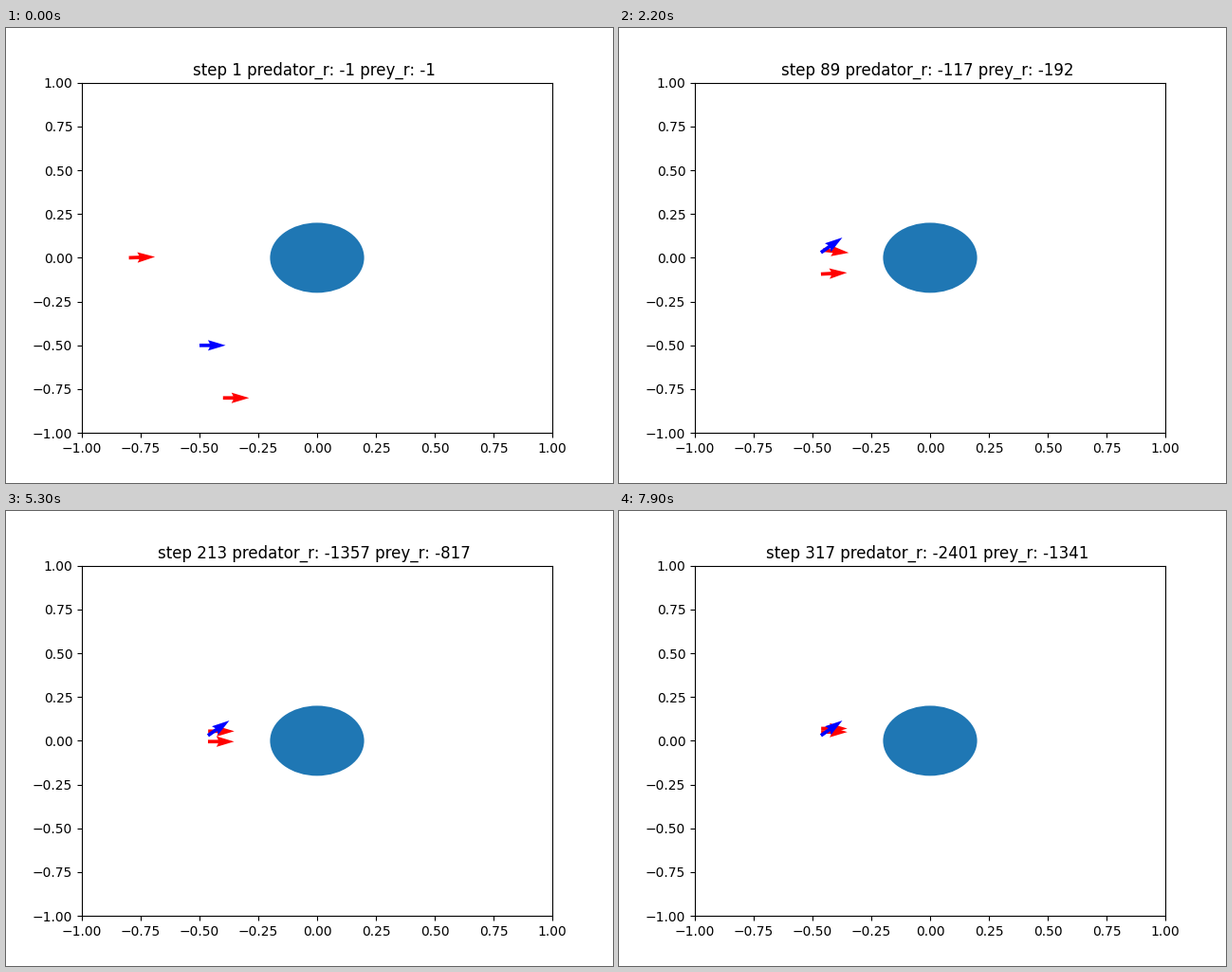
A matplotlib script that plays this animation: 640 px wide and 480 px high, repeating every 8 s.

```python
import numpy as np
import matplotlib.pyplot as plt
from matplotlib.animation import FuncAnimation

FRAMES = 80
STEPS_PER_FRAME = 4
PEAK, SWARM = 29, 90  # steps when the first and the second hunter reach the prey


def linear(t):
    return t


def accelerate(t):
    return t ** 2.2


def settle(t):
    return 1 - (1 - t) ** 2.5


def smooth(t):
    return t * t * (3 - 2 * t)


# Start pose (x, y, heading in degrees), then legs: start, end, ease, pose
HUNTER_A = (-0.8, 0, 2), [
    (0, 10, accelerate, (-0.5645, 0.056, -15)),
    (10, 22, settle, (-0.456, 0.044, -6)),
    (22, 33, linear, (-0.463, 0.033, 0)),
    (43, 61, smooth, (-0.463, 0.07, 0)),
]
HUNTER_B = (-0.4, -0.8, 0), [
    (0, 10, linear, (-0.475, -0.402, -5)),
    (10, 22, settle, (-0.464, -0.093, 3)),
    (22, 43, linear, (-0.465, -0.081, 0)),
    (43, 61, smooth, (-0.463, 0.05, 0)),
]
RUNNER = (-0.5, -0.5, 0), [
    (0, 10, linear, (-0.5, -0.078, 0)),
    (10, 16, linear, (-0.464, 0.03, 35)),
]


def pose_at(path, frame):
    start, legs = path
    pose = np.array(start, float)
    for begin, end, ease, goal in legs:
        t = np.clip((frame - begin) / (end - begin), 0, 1)
        pose += (goal - pose) * ease(t)
    return pose


def score(step, peak, late_loss):
    """Climb to the peak, then lose points at two constant rates."""
    gain = np.interp(step, [1, PEAK], [-1, peak])
    loss = 5.125 * np.clip(step - PEAK, 0, SWARM - PEAK)
    return round(gain - loss - late_loss * max(step - SWARM, 0))


fig, ax = plt.subplots(figsize=(6.4, 4.8), dpi=100)
ax.set_xlim(-1, 1)
ax.set_ylim(-1, 1)
ax.add_patch(plt.Circle((0, 0), 0.2))
title = ax.set_title("")
arrows = ax.quiver(np.zeros(3), np.zeros(3), np.ones(3), np.zeros(3),
                   color=["red", "red", "blue"], scale=18, width=0.0075)


def update(frame):
    poses = np.array([pose_at(p, frame) for p in (HUNTER_A, HUNTER_B, RUNNER)])
    heading = np.radians(poses[:, 2])
    arrows.set_offsets(poses[:, :2])
    arrows.set_UVC(np.cos(heading), np.sin(heading))

    step = 1 + STEPS_PER_FRAME * frame
    predator = score(step, 190.5, 10.0375)
    prey = score(step, 115.5, 5.038)
    # The trailing space is part of the centred line
    title.set_text(f"step {step} predator_r: {predator} prey_r: {prey} ")
    return arrows, title


anim = FuncAnimation(fig, update, frames=FRAMES, interval=1000 // 10,
                     repeat=True, repeat_delay=0, blit=False)
plt.show()
```
